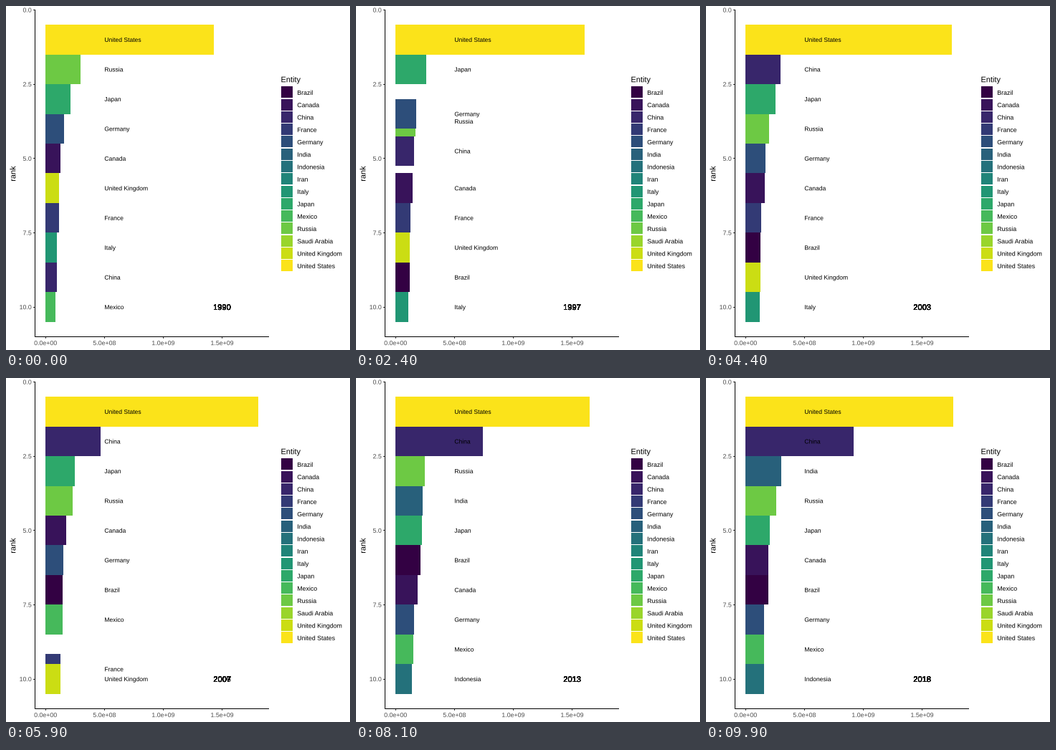
Recreate the animation shown at these times as a matplotlib script. Size 480 by 480 pixels, loop 10000 ms.

```python
import matplotlib.pyplot as plt
import numpy as np
from matplotlib.animation import FuncAnimation
from matplotlib.patches import PathPatch, Rectangle
from matplotlib.textpath import TextPath
from matplotlib.transforms import Affine2D

SIZE, FRAMES, TOP = 480, 100, 10
FIRST, LAST = 1990, 2018
YEARS = np.arange(FIRST, LAST + 1)
# Each year falls on a whole animation step; the steps between are tweened.
KEYS = np.rint((FRAMES - 1) * (YEARS - FIRST) / (LAST - FIRST)).astype(int)


def trend(start, *turns, end):
    """Yearly values in millions, running straight between turning points."""
    years, values = zip((FIRST, start), *turns, (LAST, end))
    return np.interp(YEARS, years, values)


TRENDS = {
    "Brazil": trend(82, (1994, 92), (1996, 119), (2003, 128.5), (2007, 148),
                    (2013, 213), end=193),
    "Canada": trend(127, (2007, 178), end=195),
    "China": trend(95, (1994, 116), (1995, 128), (1996, 175), (1997, 149),
                   (2003, 308), (2013, 742), end=919),
    "France": trend(114, (2000, 134), end=120),
    "Germany": trend(157, (1999, 182), (2007, 151), end=158),
    "India": trend(60, (2006, 125), end=304),
    "Indonesia": trend(30, (2013, 139), end=155),
    "Iran": trend(40, (2010, 127), end=135),
    "Italy": trend(98, (2004, 125), end=98),
    "Japan": trend(210, (1996, 263), (2007, 249), end=207),
    "Mexico": trend(85, (2003, 114), (2007, 147.5), end=156),
    "Russia": trend(298, (1994, 210), (1997, 165), (2007, 231), end=261),
    "Saudi Arabia": trend(30, (2015, 148), end=140),
    "United Kingdom": trend(116, (2007, 128), end=110),
    "United States": trend(1430, (1994, 1505), (2000, 1722), (2007, 1811),
                           (2009, 1655), (2013, 1649), end=1765),
}
NAMES = list(TRENDS)
DATA = np.array(list(TRENDS.values()))
RANKS = (-DATA).argsort(axis=0).argsort(axis=0) + 1

# Viridis, slightly darkened and warmed.
WARM = np.array([[0.92, 0.08, 0], [0, 1, 0], [0, 0, 0.95]])
COLORS = plt.cm.viridis(np.linspace(0, 1, len(NAMES)))[:, :3] ** 1.16 @ WARM.T


def px(value):
    return 55.2 + 0.1643 * value


def py(rank):
    return 5.5 + 41.45 * rank


plt.rcParams["font.family"] = "Liberation Sans"
fig = plt.figure(figsize=(SIZE / 72, SIZE / 72), dpi=72, facecolor="white")
ax = fig.add_axes([0, 0, 1, 1])
ax.set(xlim=(0, SIZE), ylim=(SIZE, 0))
ax.axis("off")


def at(x, y, angle=0):
    return Affine2D().scale(1, -1).rotate_deg(-angle).translate(x, y) + ax.transData


def text(x, y, s, size, align=0, color="black", angle=0, zorder=30):
    """Outlined text on baseline y; align is 0 left, 0.5 centre, 1 right."""
    path = TextPath((0, 0), s, size=size)
    box = path.get_extents()
    path = path.transformed(Affine2D().translate(-align * (box.x0 + box.x1), 0)
                            if align < 1 else Affine2D().translate(-box.x1, 0))
    return ax.add_patch(PathPatch(path, transform=at(x, y, angle), color=color,
                                  lw=0, snap=False, zorder=zorder))


def middle(y, size):
    """Baseline that centres capitals on y."""
    return y + 0.36 * size


def line(xs, ys, color="black"):
    ax.plot(xs, ys, color=color, lw=1, solid_capstyle="butt", snap=False, zorder=50)


def crisp(v):
    return np.floor(v) + 0.5


def draw_axes():
    grey, tick = "#4d4d4d", "#333333"
    for rank in np.arange(0, 10.1, 2.5):
        y = py(rank)
        line([38, 40], [crisp(y)] * 2, tick)
        text(35.4, middle(y, 8.8), f"{rank:.1f}", 8.8, 1, grey)
    for value in range(0, 1501, 500):
        x = px(value)
        line([crisp(x)] * 2, [462, 464], tick)
        text(x, middle(470, 8.8), f"{value * 1e6:.1e}", 8.8, 0.5, grey)
    line([40.5, 40.5], [5, 462])
    line([40, 367], [461.5, 461.5])
    text(13.3, 233.7, "rank", 11, 0.5, angle=90)


def draw_legend():
    text(383.5, middle(102.3, 11), "Entity", 11)
    for i, name in enumerate(NAMES):
        y = 112.35 + 17.28 * i
        ax.add_patch(Rectangle((384, round(y)), 16, 16, color=COLORS[i], lw=0))
        text(406.3, middle(y + 8.4, 8.8), name, 8.8)


draw_axes()
draw_legend()

bars, labels, stamps = [], [], []
for name, color in zip(NAMES, COLORS):
    bars.append(ax.add_patch(Rectangle((55, 0), 0, 0, color=color, lw=0)))
    labels.append(text(0, 0, name, 8.54))
    # One year stamp per row: the overprinting makes it look bold.
    stamps.append(text(px(1500), middle(py(10), 11.04), "0", 11.04, 0.5, zorder=40))


def year_path(year):
    path = TextPath((0, 0), str(year), size=11.04)
    box = path.get_extents()
    return path.transformed(Affine2D().translate(-(box.x0 + box.x1) / 2, 0))


YEAR_PATHS = [year_path(y) for y in YEARS]


def place(i, rank, value, year, order):
    top, bottom = round(py(rank - 0.5)), round(py(rank + 0.5))
    bars[i].set_bounds(55, top, round(px(value)) - 55, bottom - top)
    bars[i].set_zorder(2 + order)
    labels[i].set_transform(at(px(500), middle(py(rank), 8.54)))
    stamps[i].set_path(YEAR_PATHS[year])


def update(frame):
    k = np.searchsorted(KEYS, frame, "right") - 1
    n = min(k + 1, len(YEARS) - 1)
    t = (frame - KEYS[k]) / (KEYS[n] - KEYS[k]) if n > k else 0
    for i in range(len(NAMES)):
        a, b = RANKS[i, k], RANKS[i, n]
        shown = a <= TOP
        for artist in (bars[i], labels[i], stamps[i]):
            artist.set_visible(shown)
        if not shown:
            continue
        # Rows about to leave hold still until the next year.
        s = t if b <= TOP else 0
        value = DATA[i, k] + s * (DATA[i, n] - DATA[i, k])
        place(i, a + s * (b - a), value, n if s >= 0.5 else k, a)
    return bars + labels + stamps


anim = FuncAnimation(fig, update, frames=FRAMES, interval=100,
                     repeat=True, repeat_delay=0, blit=False)
plt.show()
```
